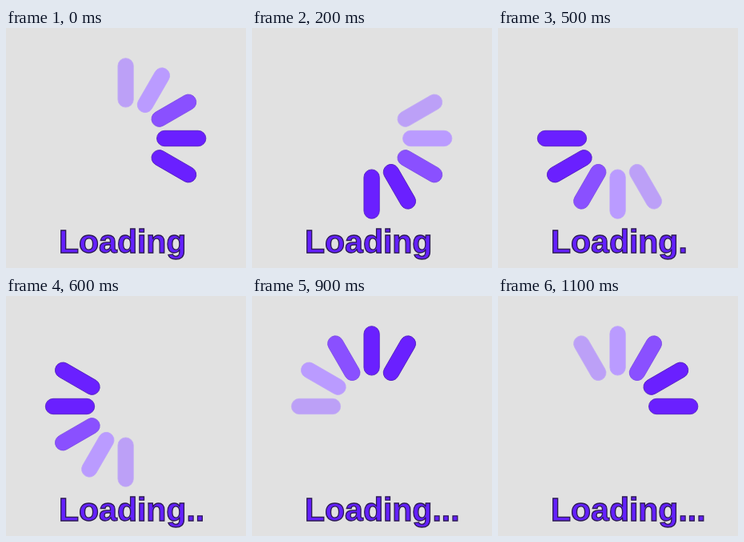
Animation, 300 px wide and 300 px high, one loop 1200 ms. Source, as an HTML page:

```html
<!DOCTYPE html>
<html lang="en">
<head>
<meta charset="utf-8">
<title>Loading</title>
<style>
  html, body { margin: 0; width: 100%; height: 100%; overflow: hidden; background: #e1e1e1; }
  svg { display: block; width: 100vw; height: 100vh; }
  text {
    font: bold 41px "Liberation Sans", Arial, sans-serif;
    fill: #6420ff;
    stroke: #2c1a52;
    stroke-width: 1.3px;
  }
</style>
</head>
<body>
<svg viewBox="0 0 300 300">
  <g id="wheel" transform="translate(149.6 138)"></g>
  <text id="label" x="66" y="280.5">Loading</text>
</svg>
<script>
  const STEP = 100, COUNT = 12, HEAD_START = 4;
  // Fill and outline from the head of the trail to its tail
  const TRAIL = [
    ["#6a20ff", "#4f1bbd"],
    ["#6a20ff", "#4f1bbd"],
    ["#8a50ff", "#7d4de6"],
    ["#ba9bff", "#bda2fa"],
    ["#bca0f7", "#c2acf3"]
  ];
  const wheel = document.getElementById("wheel");
  const label = document.getElementById("label");

  function makeBar(i) {
    const bar = document.createElementNS("http://www.w3.org/2000/svg", "rect");
    const attrs = {
      x: -9.7, y: -100.3, width: 19.4, height: 61.4, rx: 9.7,
      "stroke-width": 0.8, transform: `rotate(${i * 360 / COUNT})`
    };
    for (const name in attrs) bar.setAttribute(name, attrs[name]);
    return wheel.appendChild(bar);
  }

  const bars = Array.from({ length: COUNT }, (_, i) => makeBar(i));
  let shown = -1;

  function draw(step) {
    bars.forEach((bar, i) => {
      const age = (HEAD_START + step - i + COUNT) % COUNT;
      const [fill, stroke] = TRAIL[age] || ["none", "none"];
      bar.setAttribute("fill", fill);
      bar.setAttribute("stroke", stroke);
    });
    label.textContent = "Loading" + ".".repeat(Math.floor(step / 3));
  }

  const start = performance.now();
  function tick() {
    const step = Math.floor((performance.now() - start) / STEP) % COUNT;
    if (step !== shown) draw(shown = step);
    requestAnimationFrame(tick);
  }
  tick();
</script>
</body>
</html>
```
